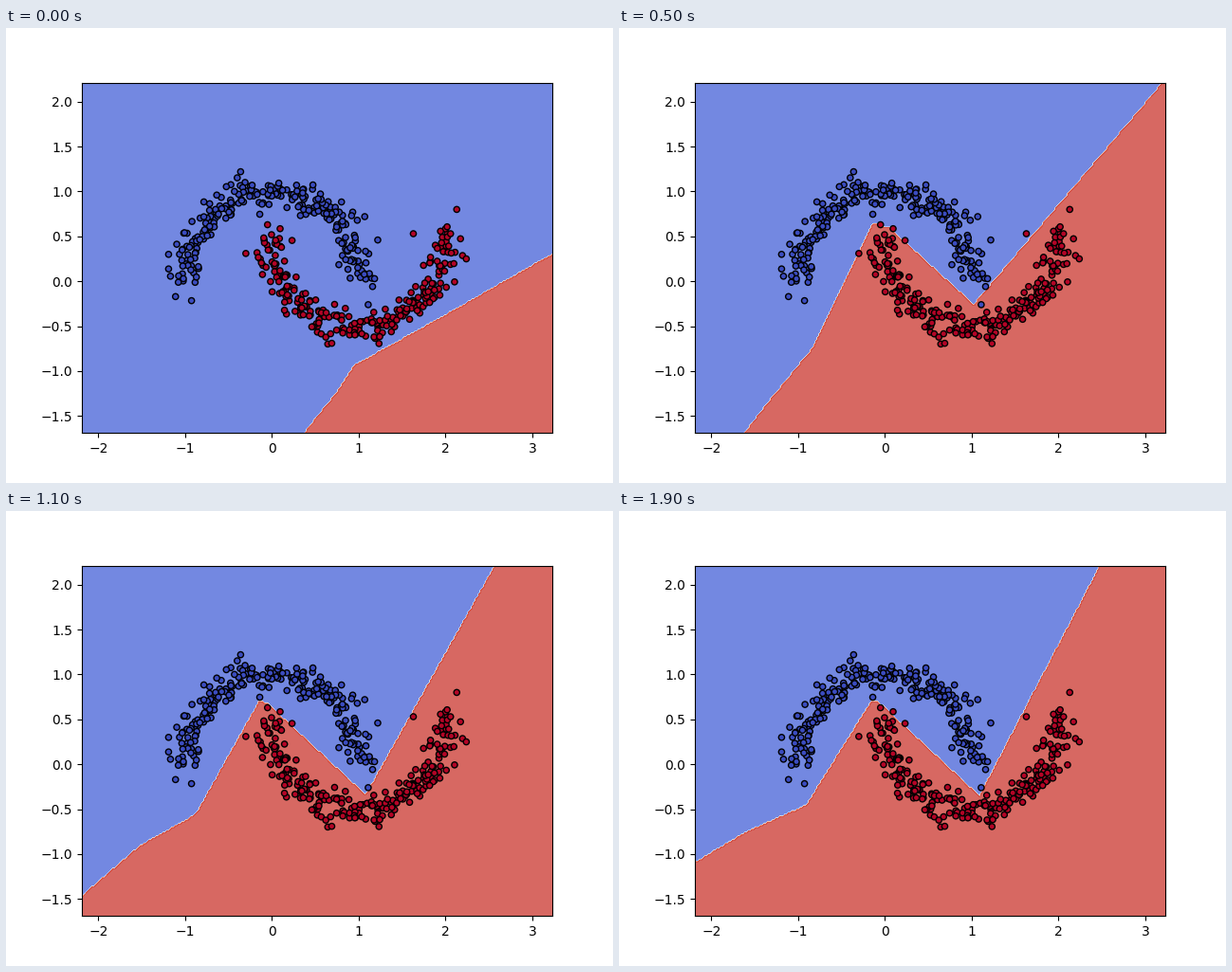
These frames come from a looping animation (640x480 px, 2 s). A matplotlib script:

```python
import numpy as np
import matplotlib.pyplot as plt
from matplotlib.animation import FuncAnimation

FRAMES, INTERVAL = 20, 100
STEP = 0.02
PER_MOON, NOISE = 244, 0.086

# A few points that lie well away from their moon.
UPPER_STRAYS = [(-0.36, 1.22), (-1.11, -0.17), (-1.19, 0.3), (1.22, 0.46), (1.07, 0.72), (1.11, -0.26)]
LOWER_STRAYS = [(2.13, 0.8), (1.63, 0.53), (-0.3, 0.31), (0.69, -0.69), (-0.05, 0.63), (2.24, 0.25)]

# Corners of the decision boundary, left to right, in stage pixels.
FLAT = np.array([(290, 458), (350, 383), (358, 370), (367, 356), (400, 338), (463, 303), (577, 238)])
BENT = np.array([(164, 513), (196, 377), (207, 330), (242, 233), (276, 227), (366, 250), (577, 188)])
FOLDED = np.array([(80, 495), (163, 388), (205, 337), (268, 206), (285, 211), (374, 292), (574, 57)])
SETTLED = np.array([(80, 360), (130, 335), (196, 305), (267, 199), (274, 202), (380, 301), (507, 57)])
BENT_AT, FOLDED_AT = 3, 5
# Frames each corner takes to settle: the right side learns faster.
DECAY = np.array([5.6, 5.6, 8, 4, 3, 3, 3])[:, None]


def make_moons(seed):
    rng = np.random.RandomState(seed)
    t = np.linspace(0, np.pi, PER_MOON)
    upper = np.column_stack([np.cos(t), np.sin(t)])
    lower = np.column_stack([1 - np.cos(t), 0.5 - np.sin(t)])
    upper, lower = (np.vstack([moon + rng.normal(scale=NOISE, size=moon.shape), strays])
                    for moon, strays in ((upper, UPPER_STRAYS), (lower, LOWER_STRAYS)))
    return np.vstack([upper, lower]), np.repeat([0, 1], [len(upper), len(lower)])


def mix(a, b, u):
    return a + (b - a) * u


def corners(frame):
    if frame < BENT_AT:
        return mix(FLAT, BENT, frame / BENT_AT)
    if frame < FOLDED_AT:
        return mix(BENT, FOLDED, (frame - BENT_AT) / (FOLDED_AT - BENT_AT))
    return mix(FOLDED, SETTLED, 1 - np.exp((FOLDED_AT - frame) / DECAY))


fig, ax = plt.subplots(figsize=(6.4, 4.8), dpi=100)
xs = np.arange(-2.189, 3.234, STEP)
ys = np.arange(-1.688, 2.215, STEP)
ax.set_xlim(xs[0], xs[-1])
ax.set_ylim(ys[0], ys[-1])

points, labels = make_moons(0)
ax.scatter(*points.T, c=labels, s=20, cmap="coolwarm", edgecolors="k", zorder=2)


def to_data(path):
    x = mix(xs[0], xs[-1], (path[:, 0] - 80) / 496)
    y = mix(ys[-1], ys[0], (path[:, 1] - 57.6) / 369.6)
    return x, y


def draw(frame):
    for old in ax.collections[1:]:
        old.remove()
    edge = np.interp(xs, *to_data(corners(frame)))
    region = (ys[:, None] < edge).astype(int)
    ax.contourf(xs, ys, region, cmap="coolwarm", alpha=0.8)


anim = FuncAnimation(fig, draw, frames=FRAMES, interval=INTERVAL,
                     init_func=lambda: None, repeat=True, repeat_delay=0)
plt.show()
```
